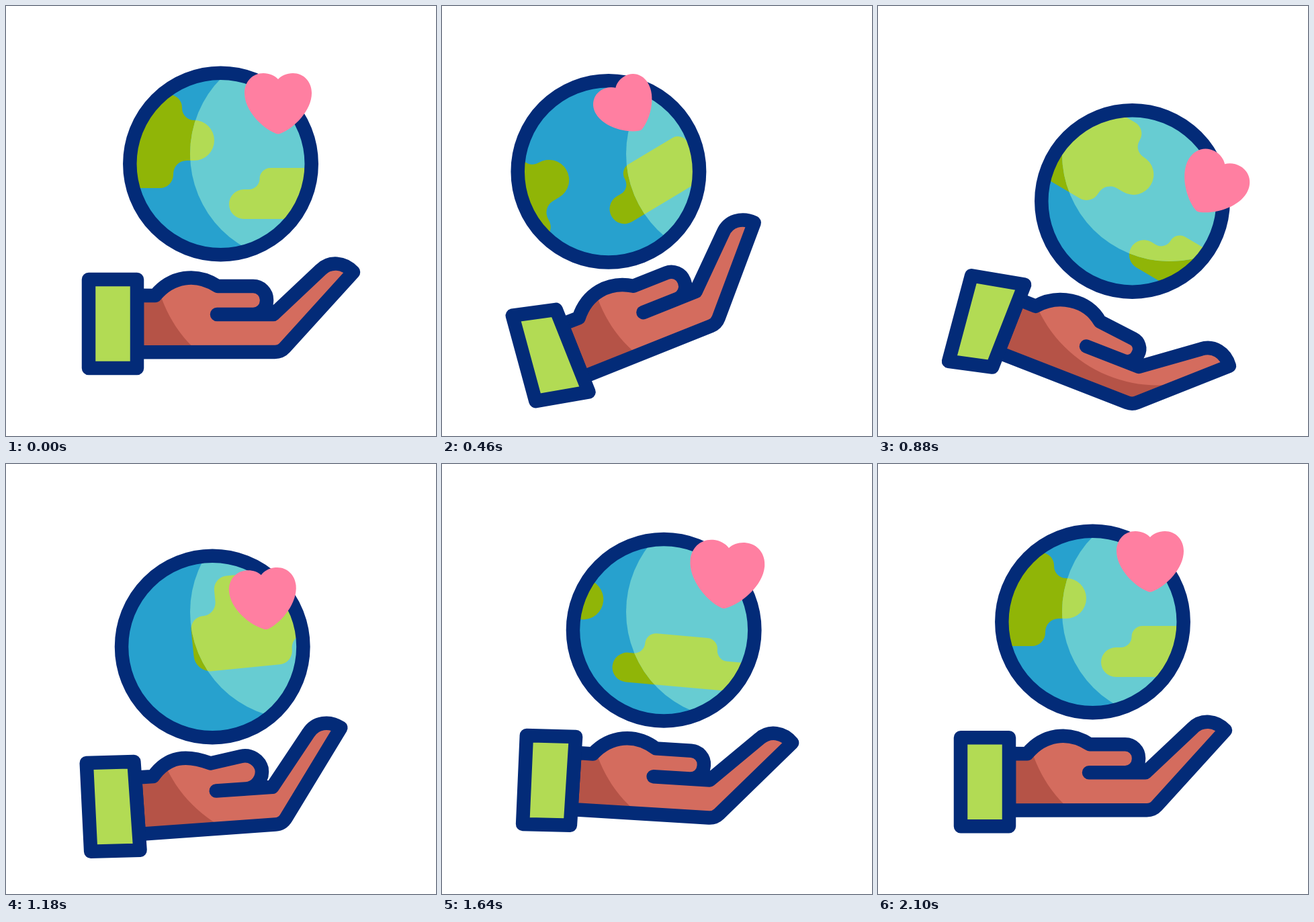
Write an HTML page with a canvas that moves like this. It is 640 by 640 pixels and loops after 2400 ms.

```html
<!DOCTYPE html>
<html>
<head>
<meta charset="utf-8">
<style>
html, body { margin: 0; height: 100%; overflow: hidden; background: #fff; }
canvas { display: block; }
</style>
</head>
<body>
<canvas id="stage" width="640" height="640"></canvas>
<script>
const ctx = document.getElementById('stage').getContext('2d');
const NAVY = '#032b78', LIME = '#b2db54', OLIVE = '#90b507';
const RAD = Math.PI / 180;
const WORLD = 560; // width of the wrapped map

// Smooth curve through (times, vals), at rest on both ends
function curve(times, vals, t) {
  const n = times.length - 1;
  t = Math.min(Math.max(t, 0), times[n]);
  let i = 0;
  while (i < n - 1 && t > times[i + 1]) i++;
  const slope = k => k <= 0 || k >= n ? 0 :
    (vals[k + 1] - vals[k - 1]) / (times[k + 1] - times[k - 1]);
  const d = times[i + 1] - times[i], u = (t - times[i]) / d, v = 1 - u;
  return vals[i] * (1 + 2 * u) * v * v + slope(i) * d * u * v * v +
    vals[i + 1] * u * u * (3 - 2 * u) - slope(i + 1) * d * u * u * v;
}
const BEATS = [0, 460, 880, 1180, 1420, 1640, 2100];
const track = (...vals) => t => curve(BEATS, vals, t);

const sway = track(0, -31, 30.5, -5.7, -9.5, 5.1, 0); // degrees
const curl = track(0, 0, 6, -9, -8, 0, 0);            // degrees, fingers only
const spin = track(0, -43, 21, 188, 357, 476, WORLD);
const heartSize = track(1, .9, 1, 1, .72, 1.11, 1);
const heartDrop = track(0, 24, 10, 27, -8, 0, 0);
const bob = t => curve([0, 330, 660, 900, 1100, 1400, 1705, 2100],
  [0, 50, -50, 62, 65, -47, 24, 0], t);
// Everything draws back a little when tilted either way
const drawBack = t => 5.5 * (sway(t) / 30) ** 2;

function circle(x, y, r) {
  const p = new Path2D();
  p.arc(x, y, r, 0, 7);
  return p;
}

// Closed polygon of [x, y, corner radius]
function rounded(pts) {
  const p = new Path2D(), [a, b] = [pts[0], pts[pts.length - 1]];
  p.moveTo((a[0] + b[0]) / 2, (a[1] + b[1]) / 2);
  pts.forEach(([x, y, r], i) => {
    const q = pts[(i + 1) % pts.length];
    p.arcTo(x, y, q[0], q[1], r);
  });
  p.closePath();
  return p;
}

function rotate([x, y], [cx, cy], degrees) {
  const c = Math.cos(degrees * RAD), s = Math.sin(degrees * RAD);
  return [cx + (x - cx) * c - (y - cy) * s, cy + (x - cx) * s + (y - cy) * c];
}
const mix = (a, b, k) => [a[0] + (b[0] - a[0]) * k, a[1] + (b[1] - a[1]) * k];

const lands = [
  rounded([[-70.5, 36, 20], [-70.5, -5, 20], [-9.5, -5, 30], [-9.5, -65, 30],
    [-57.5, -65, 18], [-57.5, -103, 19], [-177, -103, 20], [-177, -47, 20],
    [-217, -47, 19], [-217, 36, 25]]),
  rounded([[12.5, 82, 22], [12.5, 38, 22], [58, 38, 16], [58, 6, 16],
    [166, 6, 16], [166, 38, 16], [226, 38, 22], [226, 82, 22]])
];
const heart = new Path2D('M0-40.5C5-46 13-49.5 22-49.5C38-49.5 50-37 50-20C50 6 24 32 4 40Q0 42-4 40' +
  'C-24 32-50 6-50-20C-50-37-38-49.5-22-49.5C-13-49.5-5-46 0-40.5Z');
const globeLight = circle(434, 220, 160), handLight = circle(416, 368.5, 196);

function fill(path, color) {
  ctx.fillStyle = color;
  ctx.fill(path);
}
function outline(path) {
  ctx.strokeStyle = NAVY;
  ctx.lineWidth = 20.5;
  ctx.lineJoin = ctx.lineCap = 'round';
  ctx.stroke(path);
}

function drawGlobe(t) {
  const x = 319.5 + 2.12 * sway(t) - drawBack(t), y = 235 + bob(t);
  const turn = sway(t) * RAD;

  function surface(sea, land) {
    ctx.fillStyle = sea;
    ctx.fillRect(0, 0, 640, 640);
    ctx.save();
    ctx.translate(x, y);
    ctx.rotate(turn);
    ctx.translate(spin(t), 0);
    for (let i = 0; i < 2; i++) {
      lands.forEach(p => fill(p, land));
      ctx.translate(-WORLD, 0);
    }
    ctx.restore();
  }

  ctx.save();
  ctx.clip(circle(x, y, 128));
  surface('#27a1ce', OLIVE);
  ctx.clip(globeLight);
  surface('#67ccd2', LIME);
  ctx.restore();
  outline(circle(x, y, 135.2));

  ctx.save();
  ctx.translate(x, y + heartDrop(t));
  ctx.rotate(turn);
  ctx.translate(85.5, -85.5);
  ctx.scale(heartSize(t), heartSize(t));
  fill(heart, '#ff7fa1');
  ctx.restore();
}

function drawHand(t) {
  // The hand tilts about the wrist and trails the globe's bob
  const tilt = .7 * sway(t), lift = .65 * bob(t - 25);
  const pose = (x, y, share = 1) => {
    const p = rotate([x, y], [265, 473], tilt * share);
    return [p[0] - drawBack(t), p[1] + lift];
  };
  const crease = pose(314, 459), bend = pose(398, 459);
  const thumb = (x, y) => rotate(pose(x, y), crease, curl(t));
  const finger = (x, y) => rotate(pose(x, y), bend, curl(t));

  // The far edge of the cuff lags behind
  const cuffTop = pose(195, 407), cuffBottom = pose(195, 539);
  const cuff = rounded([pose(123, 407, .7), cuffTop, cuffBottom, pose(123, 539, .7)]
    .map(p => [...p, 0]));
  const end = mix(cuffTop, cuffBottom, .82);
  const t1 = thumb(388, 417), t2 = pose(388, 459);
  const r = Math.hypot(t2[0] - t1[0], t2[1] - t1[1]) * .48;

  const hand = new Path2D();
  hand.moveTo(...mix(cuffTop, cuffBottom, .18));
  hand.lineTo(...pose(222, 431));
  hand.bezierCurveTo(...pose(246, 402), ...thumb(283, 396), ...thumb(315, 417));
  hand.arcTo(...t1, ...t2, r);
  hand.arcTo(...t2, ...crease, r);
  hand.lineTo(...crease);
  hand.lineTo(...bend);
  hand.lineTo(...finger(468, 393));
  hand.bezierCurveTo(...finger(482, 379), ...finger(503, 381), ...finger(517, 396));
  hand.arcTo(...pose(409, 515), ...end, 20);
  hand.lineTo(...end);
  hand.closePath();

  ctx.save();
  ctx.clip(hand);
  fill(hand, '#b55347');
  fill(handLight, '#d46c5e');
  ctx.restore();
  outline(hand);

  fill(cuff, LIME);
  outline(cuff);
}

function frame(now) {
  const t = Math.min(Math.floor(now % 2400 / 20) * 20, 2100);
  ctx.fillStyle = '#fff';
  ctx.fillRect(0, 0, 640, 640);
  drawHand(t);
  drawGlobe(t);
}

let start;
function loop(now) {
  start ??= now;
  frame(now - start);
  requestAnimationFrame(loop);
}
frame(0);
requestAnimationFrame(loop);
</script>
</body>
</html>
```
